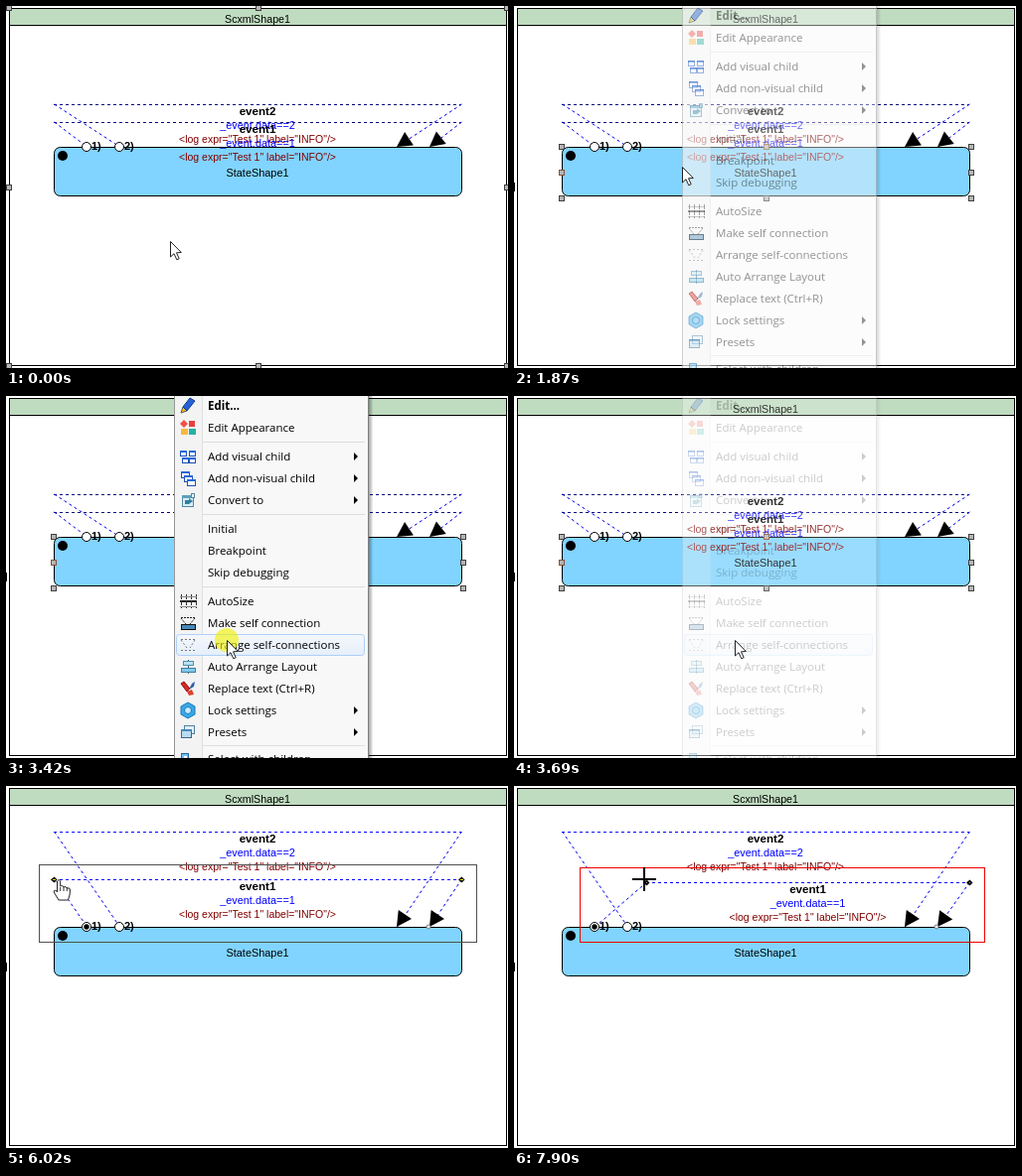
Recreate the animation shown at these times as an HTML page with a canvas. Size 505x365 px, loop 8000 ms.

```html
<!DOCTYPE html>
<html lang="en">
<head>
<meta charset="utf-8">
<title>State chart editing</title>
<style>
html, body { margin: 0; width: 100%; height: 100%; overflow: hidden; background: #fff; }
canvas { display: block; }
</style>
</head>
<body>
<canvas id="stage" width="505" height="365"></canvas>
<script>
const ctx = document.getElementById('stage').getContext('2d');
const LOOP = 8000;
const SANS = '"Liberation Sans", Arial, sans-serif';
const MENU_FONT = '"Open Sans", "Noto Sans", sans-serif';

// Menu rows: label, centre y, has submenu
const ROWS = [
  ['Edit...', 10], ['Edit Appearance', 32],
  ['Add visual child', 61, true], ['Add non-visual child', 83, true], ['Convert to', 105, true],
  ['Initial', 134], ['Breakpoint', 156], ['Skip debugging', 178],
  ['AutoSize', 207], ['Make self connection', 229], ['Arrange self-connections', 251],
  ['Auto Arrange Layout', 273], ['Replace text (Ctrl+R)', 295],
  ['Lock settings', 317, true], ['Presets', 339, true], ['Select with children', 366]
];

const between = (t, a, b) => t >= a && t < b;

// Progress in n even jumps, the first at start and the last at end
function steps(t, start, end, n) {
  const k = Math.floor((t - start) / ((end - start) / (n - 1)) + 1.001);
  return Math.max(0, Math.min(n, k)) / n;
}

// Position on a polyline of [progress, x, y] stops
function along(stops, p) {
  let i = 1;
  while (i < stops.length - 1 && p > stops[i][0]) i++;
  const [p0, x0, y0] = stops[i - 1], [p1, x1, y1] = stops[i];
  const f = (p - p0) / (p1 - p0);
  return [Math.round(x0 + (x1 - x0) * f), Math.round(y0 + (y1 - y0) * f)];
}

function rect(x, y, w, h, fill, stroke) {
  if (fill) { ctx.fillStyle = fill; ctx.fillRect(x, y, w, h); }
  if (stroke) { ctx.strokeStyle = stroke; ctx.strokeRect(x + .5, y + .5, w - 1, h - 1); }
}

function roundRect(x, y, w, h, r, fill, stroke) {
  ctx.beginPath();
  ctx.roundRect(x + .5, y + .5, w - 1, h - 1, r);
  ctx.fillStyle = fill; ctx.fill();
  ctx.strokeStyle = stroke; ctx.stroke();
}

function disc(x, y, r, fill, stroke) {
  ctx.beginPath();
  ctx.arc(x, y, r, 0, 7);
  if (fill) { ctx.fillStyle = fill; ctx.fill(); }
  if (stroke) { ctx.strokeStyle = stroke; ctx.stroke(); }
}

function poly(points, fill, stroke) {
  ctx.beginPath();
  for (const [x, y] of points) ctx.lineTo(x, y);
  ctx.closePath();
  if (fill) { ctx.fillStyle = fill; ctx.fill(); }
  if (stroke) { ctx.strokeStyle = stroke; ctx.stroke(); }
}

function line(x0, y0, x1, y1, color, dash = []) {
  ctx.setLineDash(dash);
  ctx.strokeStyle = color;
  ctx.beginPath();
  ctx.moveTo(x0, y0); ctx.lineTo(x1, y1);
  ctx.stroke();
  ctx.setLineDash([]);
}

function text(s, x, y, size, color = '#000', bold = false, align = 'center', family = SANS) {
  ctx.font = `${bold ? 'bold ' : ''}${size}px ${family}`;
  ctx.textAlign = align;
  ctx.fillStyle = color;
  ctx.fillText(s, x, y);
}

function handles(xs, ys, size, accent) {
  xs.forEach((x, i) => ys.forEach((y, j) => {
    if (i === 1 && j === 1) return;
    const warm = accent && i + j === 1;
    rect(x - size / 2, y - size / 2, size, size, '#b4b4b4', warm ? '#8c5038' : '#404040');
  }));
}

function arrowHead(x, y, fromX, fromY) {
  const len = Math.hypot(fromX - x, fromY - y);
  const ux = (fromX - x) / len, uy = (fromY - y) / len;
  const bx = x + ux * 15, by = y + uy * 15;
  poly([[x, y], [bx - uy * 8, by + ux * 8], [bx + uy * 8, by - ux * 8]], '#000');
}

function connectionLines(c, topColor) {
  const dash = [3, 3];
  line(c.left, c.y + .5, 458, c.y + .5, topColor, dash);
  line(c.left + .5, c.y, c.from + .5, 142, '#0000f0', dash);
  line(458.5, c.y, c.to + .5, 142, '#0000f0', dash);
}

function connectionLabels(c) {
  const x = (c.left + 458) / 2;
  text('event' + c.id, x, c.y + 11, 11.6, '#000', true);
  text('_event.data==' + c.id, x, c.y + 25, 10.9, '#0000ff');
  text('<log expr="Test 1" label="INFO"/>', x, c.y + 39, 10.5, '#800000');
}

function diagram(t, grip) {
  const arranged = t >= 3830, picked = t >= 5070, dragging = t >= 6620;
  const first = { id: 1, left: grip[0], y: arranged ? grip[1] : 117, from: 81, to: 426 };
  const second = { id: 2, left: 48, y: arranged ? 46 : 99, from: 114, to: 393 };
  const links = [second, first];

  rect(3, 2, 501, 361, '#fff', '#000');
  rect(3, 2, 501, 18, '#c0dcc0', '#000');
  text('ScxmlShape1', 253, 17, 10.7);
  roundRect(48, 142, 411, 50, 6, '#80d4ff', '#000');
  text('StateShape1', 253, 172, 10.9);
  disc(57, 151, 5, '#000');

  for (const c of links) connectionLines(c, arranged ? '#0000ff' : '#00007c');
  for (const c of links) {
    arrowHead(c.to, 142, 458, c.y);
    disc(c.from, 142, 4.5, '#fff', '#000');
    text(c.id + ')', c.from + 5, 145, 11, '#000', true, 'left');
  }
  for (const c of links) connectionLabels(c);

  if (t < 1270) {
    handles([3, 254, 504], [2, 183, 363], 6);
  } else {
    rect(0, 178, 1, 9, '#000');
    if (!picked) handles([48, 254, 460], [142, 168, 194], 6, true);
  }

  if (picked) {
    const left = Math.min(first.left, first.from) - 15, top = first.y - 15;
    rect(left, top, 474 - left, 158 - top, null, dragging ? '#f00000' : '#505050');
    disc(81, 142, 2.7, '#000');
    disc(425, 142, 2, '#fff', '#777');
    for (const x of [first.left, 458]) {
      const y = first.y;
      poly([[x - 3, y + .5], [x + .5, y - 2.5], [x + 3.5, y + .5], [x + .5, y + 3.5]], '#000');
      rect(x, y, 1, 1, dragging ? '#999' : '#ffff00');
      if (!dragging) rect(x - 1, y, 3, 1, '#e8e000');
    }
  }
}

// Icons are drawn around their own centre
const ICONS = {
  0() {
    poly([[-7, 7], [-5, 1], [-1, 5]], '#f0c020', '#555');
    poly([[-5, 1], [2, -8], [7, -5], [-1, 5]], '#2460d8', '#173a80');
  },
  1() {
    poly([[-4, -8], [0, -4], [-4, 0], [-8, -4]], '#f05048');
    rect(1, -7, 6, 6, '#e84040');
    rect(-7, 1, 7, 6, '#f8b840');
    rect(1, 1, 7, 6, '#28b0a0');
  },
  2() {
    for (const [x, y] of [[-8, -6], [1, -6], [1, 1], [-6, 1]]) {
      rect(x, y, 7, 6, '#e8f2ff', '#2050b0');
      rect(x, y, 7, 2, '#2468d8');
    }
  },
  3() {
    for (const [x, y] of [[-7, -7], [-4, -3], [-1, 1]]) {
      rect(x, y, 9, 7, '#fff', '#2050b0');
      rect(x, y, 9, 2, '#2468d8');
    }
  },
  4() {
    rect(-6, -5, 12, 12, '#d8edf5', '#5088a0');
    rect(-6, -5, 12, 3, '#5ca0bc');
    poly([[-3, 4], [-3, 0], [1, 0], [1, -2], [5, 1], [1, 4]], '#3080a0');
    rect(3, -7, 4, 5, '#f4faff', '#5088a0');
  },
  8() {
    rect(-8, -1, 17, 2, '#222');
    for (const x of [-7, -2, 3, 8]) line(x + .5, -7, x + .5, 7, '#333', [5, 1]);
    rect(-8, -5, 17, 1, '#888');
    rect(-8, 5, 17, 1, '#888');
  },
  9() {
    line(-7, -5.5, 8, -5.5, '#222', [2, 1]);
    line(-7, -5, -2, 1, '#222', [2, 1]);
    line(7, -5, 2, 1, '#222', [2, 1]);
    rect(-7, 1, 15, 6, '#4888b8', '#111');
  },
  10() {
    line(-7, -5.5, 8, -5.5, '#777', [2, 2]);
    line(-7, -5, -1, 3, '#777', [2, 2]);
    line(7, -5, 2, 3, '#777', [2, 2]);
    line(-7, 5.5, 8, 5.5, '#777', [2, 2]);
  },
  11() {
    rect(0, -7, 1, 14, '#456');
    rect(-5, -6, 11, 5, '#b8e0f4', '#5090b0');
    rect(-7, 1, 15, 5, '#80c8ec', '#4080a0');
  },
  12() {
    poly([[-7, -5], [-4, -7], [2, 0], [-1, 3]], '#d82820', '#901010');
    poly([[1, 1], [4, -5], [7, -7], [6, -2]], '#3060a8');
    poly([[-1, 3], [4, 1], [6, 6], [1, 7]], '#e04030');
  },
  13() {
    poly([[0, -8], [7, -4], [7, 4], [0, 8], [-7, 4], [-7, -4]], '#38a8e8', '#1878b8');
    disc(0, 0, 3.5, '#c8ecff', '#1878b8');
  },
  14() {
    rect(-4, -7, 11, 9, '#e4f0f8', '#5080a0');
    rect(-7, -3, 11, 9, '#b8dcf0', '#406888');
    rect(-7, -3, 11, 2, '#4888b8');
  },
  15() {
    rect(-7, -6, 8, 9, '#70c0f0', '#2868a0');
    rect(-4, -3, 3, 3, '#fff');
  }
};

function menu(alpha, cursorY, hovering) {
  if (!alpha) return;
  ctx.save();
  ctx.globalAlpha = alpha;
  for (let i = 0; i < 4; i++) rect(365 + i, 0, 1, 365, `rgba(0,0,0,${.32 - i * .08})`);
  rect(169, 0, 196, 365, '#f8f8f8');
  rect(170, 0, 27, 365, '#f3f3f3');
  rect(169, 0, 1, 365, '#979797');
  rect(364, 0, 1, 365, '#808080');
  rect(197, 0, 1, 365, '#e0e0e0');
  for (const y of [46, 119, 192, 352]) rect(198, y, 163, 1, '#dedede');

  ROWS.forEach(([label, y, sub], i) => {
    if (hovering && cursorY >= y - 11 && cursorY < y + 11) {
      const glow = ctx.createLinearGradient(0, y - 11, 0, y + 11);
      glow.addColorStop(0, '#f5f8fc');
      glow.addColorStop(1, '#e4effb');
      roundRect(171, y - 11, 190, 22, 3, glow, '#aecff7');
    }
    if (ICONS[i]) {
      ctx.save();
      ctx.translate(183, y);
      ICONS[i]();
      ctx.restore();
    }
    text(label, 203, y + 4, 11.5, '#000', i === 0, 'left', MENU_FONT);
    if (sub) poly([[350, y - 4], [354, y], [350, y + 4]], '#000');
  });
  ctx.restore();
}

const CURSORS = {
  arrow() {
    poly([[.5, .5], [.5, 16], [4, 12.7], [6.8, 18.8], [9.2, 17.7], [6.5, 11.8], [11.3, 11.5]], '#fff', '#222');
  },
  hand() {
    ctx.beginPath();
    ctx.moveTo(-1.5, 13);
    ctx.lineTo(-1.5, 2);
    ctx.quadraticCurveTo(0, -1, 1.7, 2);
    ctx.lineTo(1.7, 7);
    ctx.quadraticCurveTo(4, 5.5, 5, 8);
    ctx.quadraticCurveTo(7.5, 6.5, 8.3, 9);
    ctx.quadraticCurveTo(11.5, 8, 11.5, 11);
    ctx.lineTo(11, 16);
    ctx.lineTo(9.5, 21);
    ctx.lineTo(0, 21);
    ctx.lineTo(-4.8, 13);
    ctx.quadraticCurveTo(-5, 9.5, -1.5, 12.5);
    ctx.closePath();
    ctx.fillStyle = '#fff'; ctx.fill();
    ctx.strokeStyle = '#222'; ctx.stroke();
    for (const x of [1.7, 5, 8.3]) line(x, 8, x, 12, '#333');
  },
  cross() {
    rect(-12, -1, 24, 2, '#000');
    rect(-1, -12, 2, 24, '#000');
  }
};

function cursorAt(t) {
  if (t < 2340) return along([[0, 165, 237], [.6, 181, 192], [1, 169, 162]], steps(t, 730, 1010, 5));
  if (t < 4230) return along([[0, 169, 162], [1, 222, 246]], steps(t, 2340, 2830, 8));
  if (t < 5070) return along([[0, 222, 246], [.5, 85, 99], [.75, 80, 99], [1, 80, 99]], steps(t, 4230, 5000, 12));
  if (t < 5880) return along([[0, 80, 99], [1, 60, 94]], steps(t, 5070, 5810, 9));
  if (t < 6230) return along([[0, 60, 94], [1, 53, 94]], steps(t, 5880, 6020, 3));
  return along([[0, 46, 91], [.4, 84, 90], [1, 131, 94]], steps(t, 6620, 7310, 10));
}

function menuAlpha(t) {
  if (t < 1800 || t >= 3730) return 0;
  if (t < 2010) return [.18, .42, .75][Math.floor((t - 1800) / 70)];
  if (t < 3550) return 1;
  return t < 3600 ? .75 : t < 3660 ? .45 : .2;
}

const CLICKS = [[1270, 1400], [1730, 1800], [3420, 3550], [4860, 5000], [6360, 7900]];

function draw(t) {
  ctx.fillStyle = '#fff';
  ctx.fillRect(0, 0, 505, 365);
  ctx.lineWidth = 1;

  const [x, y] = cursorAt(t);
  const kind = t >= 6230 ? 'cross' : t >= 4580 ? 'hand' : 'arrow';
  diagram(t, t >= 6620 ? [x + (x < 90 ? 1 : 2), y + 3] : [48, 94]);
  menu(menuAlpha(t), y, t >= 2340);

  const clicked = CLICKS.some(([a, b]) => between(t, a, b));
  const glow = () => clicked && disc(x, y, 12, 'rgba(240,240,0,.62)');
  if (kind !== 'cross') glow();
  ctx.save();
  ctx.translate(x, y);
  CURSORS[kind]();
  ctx.restore();
  if (kind === 'cross') glow();
}

function tick() {
  draw(performance.now() % LOOP);
  requestAnimationFrame(tick);
}
tick();
</script>
</body>
</html>
```
